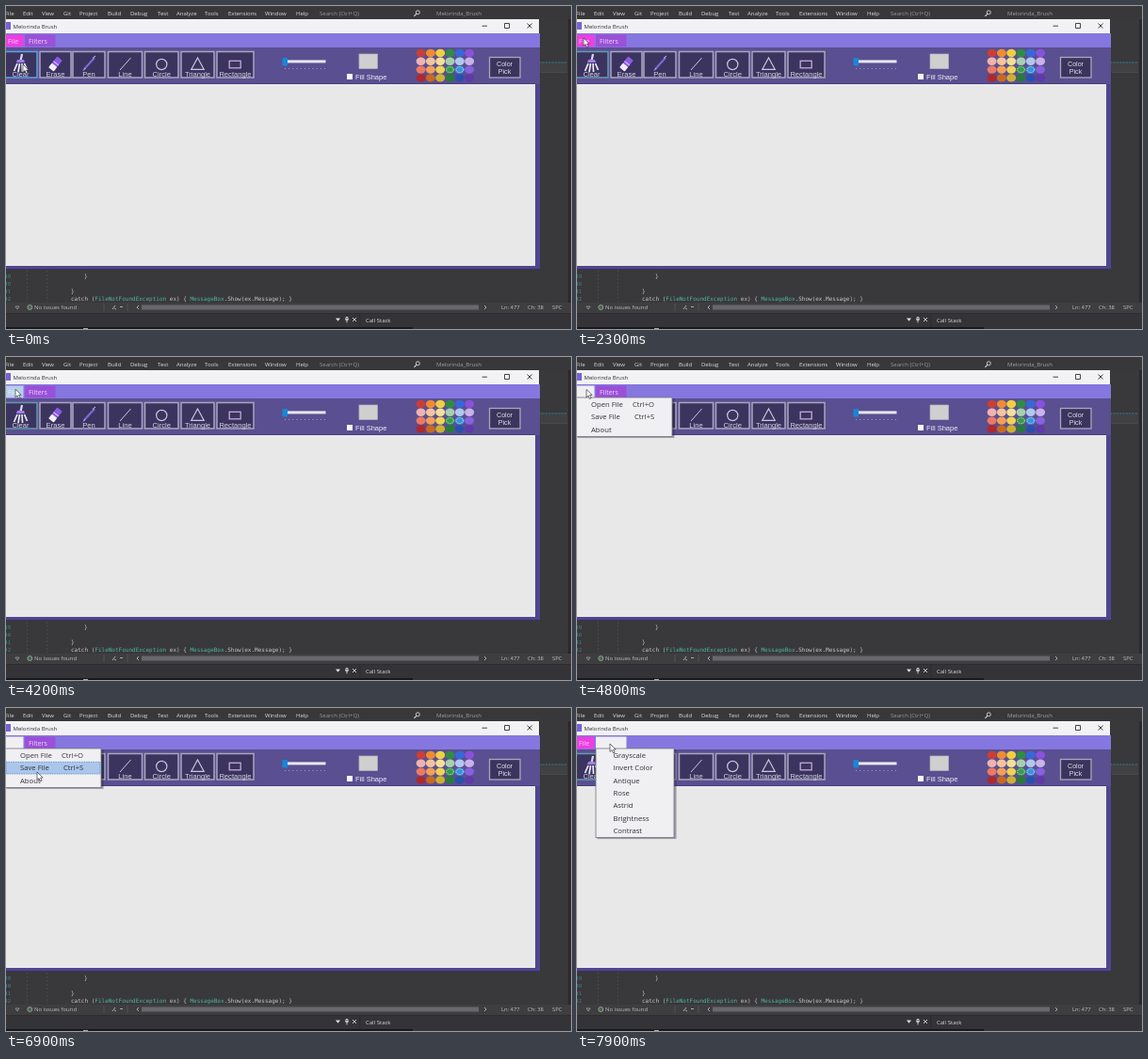
Write an HTML page that moves like this. It is 600 px wide and 343 px high and loops after 8000 ms.

```html
<!DOCTYPE html>
<html lang="en">
<head>
<meta charset="utf-8">
<title>Paint program</title>
<style>
  html, body { margin: 0; width: 100%; height: 100%; overflow: hidden; background: #353436; }
  svg { display: block; width: 100vw; height: 100vh; }
  text { white-space: pre; }
  .ui { font-family: "Open Sans", "Noto Sans", sans-serif; }
  .tool { font-family: "Liberation Sans", Arial, sans-serif; }
  .code { font-family: "DejaVu Sans Mono", monospace; }
</style>
</head>
<body>
<svg id="stage" viewBox="0 0 600 343"></svg>
<script>
const LOOP = 8000;
const stage = document.getElementById('stage');

function add(parent, tag, attrs, content) {
  const node = document.createElementNS('http://www.w3.org/2000/svg', tag);
  for (const key in attrs) node.setAttribute(key, attrs[key]);
  if (content !== undefined) node.textContent = content;
  parent.appendChild(node);
  return node;
}
const group = (parent = stage) => add(parent, 'g', {});
const rect = (p, x, y, width, height, fill, more) =>
  add(p, 'rect', { x, y, width, height, fill, ...more });
const path = (p, d, stroke, width = 1, more) =>
  add(p, 'path', { d, stroke, 'stroke-width': width, fill: 'none', ...more });
const label = (p, x, y, str, size, fill, cls = 'ui', more) =>
  add(p, 'text', { x, y, 'font-size': size, fill, class: cls, ...more }, str);

function drawEditor() {
  const g = group();
  rect(g, 0, 0, 600, 343, '#39383a');
  rect(g, 0, 0, 600, 14, '#38373a');
  const menu = { File: -1, Edit: 18, View: 38, Git: 61, Project: 78, Build: 108, Debug: 132,
    Test: 161, Analyze: 181, Tools: 211, Extensions: 236, Window: 275, Help: 308 };
  for (const name in menu) label(g, menu[name], 10, name, 6, '#dededf');
  label(g, 333, 10, 'Search (Ctrl+Q)', 6, '#99999b');
  add(g, 'circle', { cx: 437.3, cy: 6.8, r: 2, fill: 'none', stroke: '#ddd', 'stroke-width': .9 });
  path(g, 'M435.8 8.3L433.4 10.8', '#ddd', 1.1);
  label(g, 457, 10, 'Melorinda_Brush', 6, '#a2a2a4');

  rect(g, 566, 61, 30, 9, '#414043');
  path(g, 'M566 60H596', '#347f91', 1, { 'stroke-dasharray': '2.5 .8' });
  path(g, 'M568 70.5H596', '#515054', .7);
  rect(g, 597, 14, 3, 312, '#2a292c');

  path(g, 'M22.5 281V314M43.5 281V314', '#555457', .6, { 'stroke-dasharray': '2 2' });
  ['339', '340', '341', '342'].forEach((n, i) => label(g, -5, 289 + i * 8, n, 5.6, '#398395', 'code'));
  label(g, 83, 289, '}', 6, '#c8c8c8', 'code');
  label(g, 69, 305, '}', 6, '#c8c8c8', 'code');
  const line = label(g, 69, 313, '', 6, '#c8c8c8', 'code');
  [['catch ('], ['FileNotFoundException', '#4fb79f'], [' ex) { '], ['MessageBox', '#4fb79f'],
    ['.Show(ex.Message); }']]
    .forEach(([str, fill = '#c8c8c8']) => add(line, 'tspan', { fill }, str));

  rect(g, 0, 315, 600, 11, '#3e3e41');
  path(g, 'M10 319h4l-2 3z', '#aaa', .7);
  add(g, 'circle', { cx: 25.3, cy: 320, r: 2.5, fill: '#49644f', stroke: '#9ab4a0', 'stroke-width': .8 });
  label(g, 30, 322, 'No issues found', 6, '#bfbfc1');
  path(g, 'M104 316V324M129 316V324', '#5d5d60', .7);
  path(g, 'M113 322l3-4M115 321l2 1M121 319.5h3', '#aaa', 1);
  path(g, 'M141 318l-2 2l2 2', '#bbb', .9);
  rect(g, 144, 317.5, 358, 5, '#68676b');
  path(g, 'M508 318l2 2l-2 2', '#bbb', .9);
  label(g, 526, 322, 'Ln: 477', 5.8, '#c4c4c6');
  label(g, 554, 322, 'Ch: 38', 5.8, '#c4c4c6');
  label(g, 580, 322, 'SPC', 5.8, '#c4c4c6');

  rect(g, 0, 326, 600, 17, '#343337');
  rect(g, 0, 326, 600, 1, '#2d2c2f');
  rect(g, 375, 327, 1.5, 16, '#2d2c2f');
  add(g, 'path', { d: 'M350 331.5h5l-2.5 3.2z', fill: '#ddd' });
  path(g, 'M360 333h4M362 333v3.3M361 330.5v2.5h2v-2.5z', '#ddd', .9);
  path(g, 'M368 331l4 4M372 331l-4 4', '#ddd', .9);
  label(g, 382, 336, 'Call Stack', 6, '#dededf');
  rect(g, 0, 341, 432, 2, '#19181b');
  rect(g, 82, 342, 5, 1, '#aaa');
}

function toolIcon(g, name, cx) {
  const ink = '#cbc8dc';
  if (name === 'Clear') {
    path(g, 'M17 51L15.5 58', '#d9d6ee', 2.2);
    add(g, 'path', { d: 'M12 57h7l1 3h-9z', fill: '#a47cf0' });
    path(g, 'M12 61L8.5 69M14.5 61L13 70M17 61L17.5 70M19.5 61L22.5 68', '#eeeaf9', 1.7);
  } else if (name === 'Erase') {
    const r = add(g, 'g', { transform: 'translate(52.5 61.5) rotate(-52)' });
    rect(r, -7.5, -3.5, 15, 7, '#8d5ae6', { rx: 1 });
    rect(r, -7.5, -3.5, 6, 7, '#f2eef9', { rx: 1 });
    path(r, 'M1-3.5v7', '#dcd0f5', 1);
  } else if (name === 'Pen') {
    path(g, 'M83 67L94 55', '#7d68d8', 2.1);
    path(g, 'M82 68.5l2.2-2.4M92 55.5L95 53', '#d5d0ed', 1);
  } else if (name === 'Line') {
    path(g, 'M121 68L132.5 55', ink, 1);
  } else if (name === 'Circle') {
    add(g, 'circle', { cx, cy: 62, r: 5.6, fill: 'none', stroke: ink, 'stroke-width': 1.2 });
  } else if (name === 'Triangle') {
    path(g, 'M203.5 55L210.2 67.3H196.8Z', ink, 1.2);
  } else {
    rect(g, 237.2, 58.3, 12, 7.5, 'none', { stroke: '#c4a9d9', 'stroke-width': 1.3 });
  }
}

let clearFrame;
function drawPaint() {
  const g = group();
  rect(g, 0, 14, 566, 15, '#f2f1f4');
  rect(g, 0, 17, 5, 8, '#7762d4');
  label(g, 7.5, 23.5, 'Melorinda Brush', 6, '#313034');
  path(g, 'M505.5 21.2H511M529.5 18.5h5v5h-5zM553.5 18.5l5 5M558.5 18.5l-5 5', '#333', .9);
  rect(g, 0, 29, 567, 15, '#8577df');
  rect(g, 0, 44, 567, 236, '#4e4690');
  rect(g, 0, 44, 567, 39, '#5a4f90');
  rect(g, 0, 83, 562, 193, '#e9e8e9');
  path(g, 'M0 82.5H562', '#423a79', .8);
  path(g, 'M0 279.5H567', '#39345f', 1);

  const tools = [['Clear', -2, 33], ['Erase', 36, 69], ['Pen', 71, 105], ['Line', 108.5, 144.5],
    ['Circle', 147.5, 183], ['Triangle', 186, 221], ['Rectangle', 224, 263]];
  for (const [name, left, right] of tools) {
    const cx = (left + right) / 2;
    const box = rect(g, left, 48.5, right - left, 27.5, '#3b345f', { stroke: '#aaa6bd', 'stroke-width': 1.5 });
    if (name === 'Clear') clearFrame = box;
    toolIcon(g, name, cx);
    label(g, cx, 75, name, 7.6, '#d6d3e2', 'tool', { 'text-anchor': 'middle' });
  }

  rect(g, 296, 57.4, 43.5, 3, '#e8e7ee');
  rect(g, 293.5, 55, 5.5, 8.5, '#1687d8', { rx: 1 });
  path(g, 'M296 66.5H339', '#a39db9', 1.2, { 'stroke-dasharray': '1 3.2' });
  rect(g, 375, 51, 19.5, 15.5, '#cfcfcf', { stroke: '#b6b5bd', 'stroke-width': .7 });
  rect(g, 362, 72, 6, 6, '#f8f8f8');
  label(g, 371, 77.5, 'Fill Shape', 7.5, '#f0eef7', 'tool');

  const palette = [
    ['#cb3e36', '#ef8b31', '#f0ce43', '#318b45', '#3768da', '#8951dc'],
    ['#efb3b2', '#f2c59f', '#f2df99', '#a8cfad', '#b1c8ed', '#c8b2e9'],
    ['#ee7962', '#f2a05a', '#f1d159', '#379b4b', '#3c92dd', '#8861de'],
    ['#af282e', '#c86922', '#cfae33', '#287a3d', '#2950b0', '#6139a8']
  ];
  palette.forEach((row, j) => row.forEach((fill, i) => {
    const cx = 440.6 + i * 10.3, cy = 50 + j * 8.8;
    add(g, 'ellipse', { cx, cy, rx: 5, ry: 4.2, fill });
    if (j === 2 && (i === 3 || i === 4))
      add(g, 'ellipse', { cx, cy, rx: 3.8, ry: 3, fill: 'none', stroke: '#d7e6e8',
        'stroke-width': 1, 'stroke-dasharray': '1 1.2' });
  }));

  rect(g, 513.5, 54.5, 32.5, 21.5, '#3b345c', { stroke: '#aaa6bd', 'stroke-width': 1.3 });
  label(g, 529.5, 63.6, 'Color', 7.1, '#e2dfeb', 'tool', { 'text-anchor': 'middle' });
  label(g, 529.5, 72, 'Pick', 7.1, '#e2dfeb', 'tool', { 'text-anchor': 'middle' });
}

function drawTab(x, width, name, fill) {
  const g = group();
  const box = rect(g, x, 30.5, width, 12.7, fill);
  const text = label(g, x + 4, 39.8, name, 7, '#f4d5fb');
  return { box, text, fill };
}

function drawMenu(x, width, items, textX) {
  const g = group(), height = 1.5 + items.length * 13.3;
  rect(g, x + 1.5, 44.5, width + 1, height, '#27223c', { opacity: .4 });
  rect(g, x, 43, width, height, '#f0eff2', { stroke: '#77747e', 'stroke-width': .8 });
  const marker = rect(g, x + 1, 43, width - 2, 12.7, '#abc6ea', { stroke: '#4d94d5', 'stroke-width': .8,
    'stroke-dasharray': '1.5 1' });
  items.forEach(([name, key], i) => {
    label(g, textX, 53.1 + i * 13.3, name, 7.7, '#343238');
    if (key) label(g, key === 'Ctrl+O' ? 59 : 61, 53.1 + i * 13.3, key, 7.7, '#343238');
  });
  return { g, marker };
}

drawEditor();
drawPaint();
const fileTab = drawTab(-2, 20.5, 'File', '#ee3ee2');
const filterTab = drawTab(20, 32.5, 'Filters', '#9a50d8');
const fileMenu = drawMenu(-1, 102, [['Open File', 'Ctrl+O'], ['Save File', 'Ctrl+S'], ['About']], 15);
const filterMenu = drawMenu(20, 83, ['Grayscale', 'Invert Color', 'Antique', 'Rose', 'Astrid',
  'Brightness', 'Contrast'].map(name => [name]), 38.5);
filterMenu.marker.style.display = 'none';
const cursor = add(stage, 'path', { d: 'M0 0V8.4L2 6.6L3.6 10L5.1 9.2L3.6 6H6.2Z',
  fill: '#fff', stroke: '#37343c', 'stroke-width': .7 });

// Stops of the pointer: time, x, y
const route = [[0, 18, 62], [1700, 18, 62], [2300, 7, 34], [2900, 10, 34],
  [5200, 10, 34.5], [5800, 24, 51], [6100, 25, 52], [6600, 33, 68], [7000, 33, 68],
  [7500, 35, 38], [LOOP, 35, 38]];
const HOVER_FILE = 2350, OPEN_FILE = 4450;

function cursorAt(t) {
  const i = Math.max(1, route.findIndex(stop => stop[0] > t));
  const [t0, x0, y0] = route[i - 1], [t1, x1, y1] = route[i];
  const u = (t - t0) / (t1 - t0), k = u * u * (3 - 2 * u);
  return [x0 + (x1 - x0) * k, y0 + (y1 - y0) * k];
}

const show = (node, visible) => { node.style.display = visible ? '' : 'none'; };
function paintTab(tab, state) {
  tab.box.setAttribute('fill', { open: '#f0eff2', hover: '#b7cfea' }[state] || tab.fill);
  tab.text.setAttribute('fill', { open: '#f0eff2', hover: '#eef3fb' }[state] || '#f4d5fb');
}

function render(t) {
  const [x, y] = cursorAt(t);
  const filtersOpen = t > 7000 && y < 43.5;
  const fileOpen = t >= OPEN_FILE && !filtersOpen;
  const fileHover = t >= HOVER_FILE && t < OPEN_FILE;
  const row = Math.floor((y - 43.6) / 13.3);
  cursor.setAttribute('transform', `translate(${x} ${y})`);
  clearFrame.setAttribute('stroke', t < OPEN_FILE && y > 48 ? '#58a5df' : '#639baa');
  paintTab(fileTab, fileOpen ? 'open' : fileHover ? 'hover' : '');
  paintTab(filterTab, filtersOpen ? 'open' : '');
  show(fileMenu.g, fileOpen);
  show(filterMenu.g, filtersOpen);
  show(fileMenu.marker, row >= 0);
  fileMenu.marker.setAttribute('y', 44 + row * 13.3);
}

const start = performance.now();
function tick(now) {
  render(Math.max(0, now - start) % LOOP);
  requestAnimationFrame(tick);
}
render(0);
requestAnimationFrame(tick);
</script>
</body>
</html>
```
